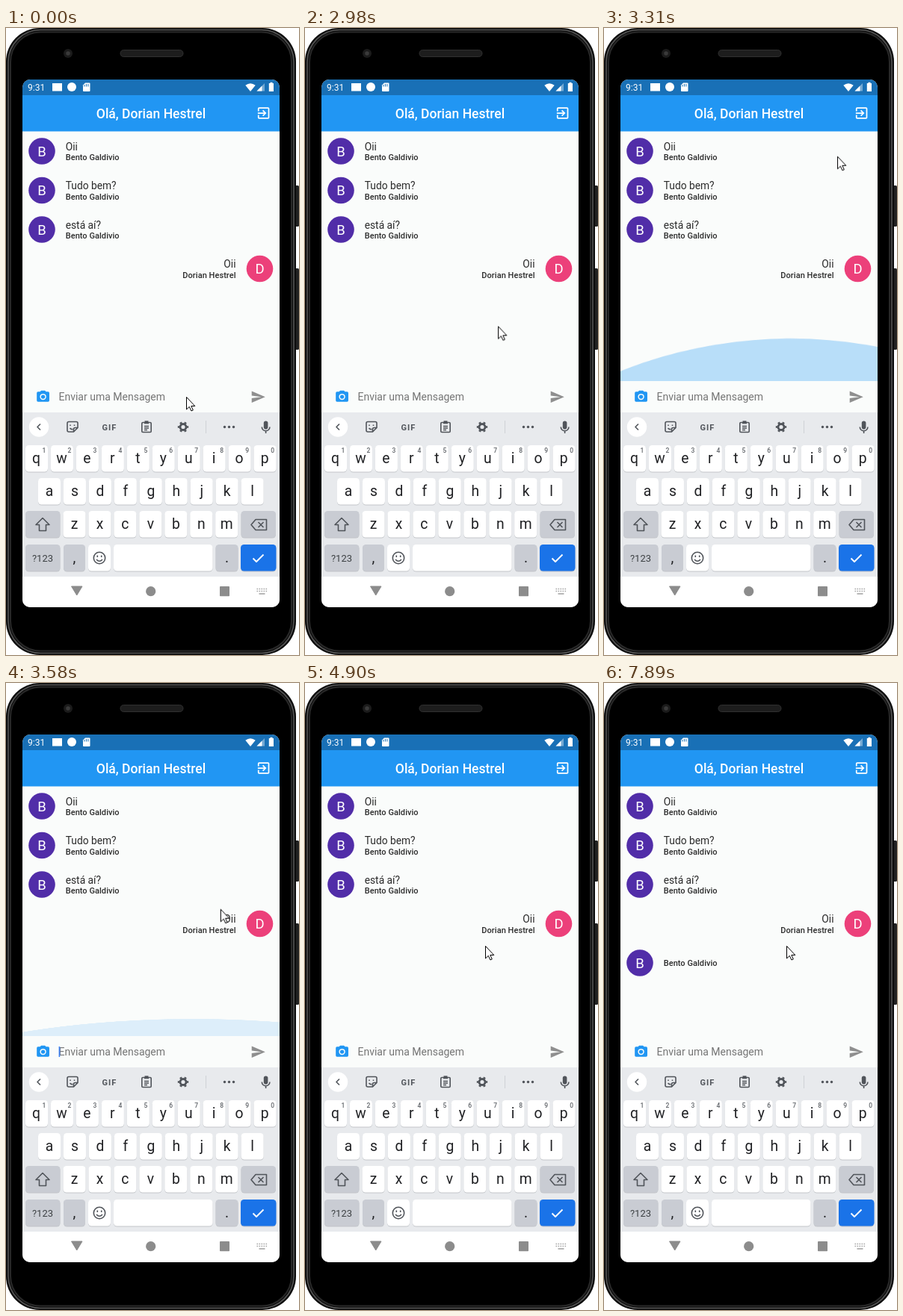
Write an HTML page that moves like this. It is 392 by 840 pixels and loops after 8 s.

```html
<!DOCTYPE html>
<html lang="pt-BR">
<head>
<meta charset="utf-8">
<title>Chat</title>
<style>
  html, body { margin: 0; width: 100%; height: 100%; overflow: hidden; background: #fff; }
  svg { display: block; width: 100%; height: 100%; font-family: Roboto, "Noto Sans", sans-serif; }
  .mid { text-anchor: middle; }
  .end { text-anchor: end; }
  .msg { font-size: 13.8px; fill: #2b2b2b; }
  .name { font-size: 11px; font-weight: 500; letter-spacing: .05px; fill: #2b2b2b; }
  .letter { font-size: 18.5px; fill: #fff; text-anchor: middle; }
  .key { font-size: 19.3px; fill: #202124; text-anchor: middle; }
  .digit { font-size: 8.5px; font-weight: 500; fill: #5f6368; text-anchor: middle; }
  .line { fill: none; stroke: #50545a; stroke-width: 1.6; stroke-linejoin: round; }

  #mouse, #caret, #newRow, .glow { animation: 8s linear infinite; }
  #mouse { animation-name: mouse; }
  #caret { animation-name: blink; animation-timing-function: step-end; }
  #newRow { animation-name: arrive; animation-timing-function: step-end; }
  .glow { fill: #2196f3; }
  #glowEnd { animation-name: pullEnd; transform-origin: 0 473px; }
  #glowStart { animation-name: pullStart; transform-origin: 0 139px; }

  @keyframes mouse {
    0%, 28.6% { transform: translate(241px, 494px); animation-timing-function: cubic-bezier(.5, 0, .8, .6); }
    37.25% { transform: translate(258px, 400px); }
    38.875%, 39.3% { transform: translate(273px, 318px); }
    41.375% { transform: translate(312px, 172px); }
    42% { transform: translate(315px, 158px); animation-timing-function: ease-in-out; }
    44.75% { transform: translate(287px, 302px); animation-timing-function: ease-out; }
    49% { transform: translate(245px, 440px); }
    50.25% { transform: translate(242px, 430px); animation-timing-function: ease-out; }
    55%, 98.62% { transform: translate(241px, 352px); }
    98.625%, 100% { transform: translate(244px, 352px); }
  }
  @keyframes blink {
    0%, 10.875%, 23.625%, 36.125%, 48.625%, 61.25%, 73.625%, 86.375%, 98.625%, 100% { opacity: 0; }
    3.875%, 17.375%, 29.875%, 42.375%, 55%, 67.5%, 80%, 92.375% { opacity: 1; }
  }
  @keyframes arrive {
    0% { opacity: 0; }
    96.875%, 100% { opacity: 1; }
  }
  @keyframes pullEnd {
    0%, 39.125% { transform: scaleY(0); opacity: 0; }
    41.375% { transform: scaleY(.82); opacity: .3; }
    41.825% { transform: scaleY(.9); opacity: .35; animation-timing-function: cubic-bezier(.333, .667, .667, 1); }
    49.325%, 100% { transform: scaleY(0); opacity: 0; }
  }
  @keyframes pullStart {
    0%, 45.5% { transform: scaleY(0); opacity: 0; }
    49.25% { transform: scaleY(.9); opacity: .1; animation-timing-function: cubic-bezier(.333, .667, .667, 1); }
    56.75%, 100% { transform: scaleY(0); opacity: 0; }
  }
</style>
</head>
<body>
<svg viewBox="0 0 392 840">
  <defs>
    <clipPath id="screen"><rect x="22" y="69" width="344" height="707" rx="10.500"/></clipPath>
    <clipPath id="list"><rect x="22" y="139" width="344" height="334"/></clipPath>
  </defs>

  <!-- phone body -->
  <g fill="#222">
    <rect x="386" y="211" width="6" height="55" rx="1.500"/>
    <rect x="386" y="322" width="6" height="109" rx="1.500"/>
  </g>
  <rect width="388" height="840" rx="45" fill="#0c0c0c"/>
  <rect x="3" y="2.500" width="382" height="835" rx="43" fill="none" stroke="#565656" stroke-width="1.600"/>
  <rect x="6" y="5.500" width="376" height="829" rx="40" fill="#000" stroke="#282828" stroke-width="2"/>
  <rect x="153" y="29.500" width="84" height="9" rx="4.500" fill="#1d1d1d" stroke="#303030"/>
  <circle cx="83" cy="34" r="6" fill="#1b1b1b"/>
  <circle cx="83" cy="34" r="2.800" fill="#3a3a3a"/>

  <g clip-path="url(#screen)">
    <rect x="22" y="69" width="344" height="707" fill="#fafcfb"/>

    <!-- status and app bar -->
    <rect x="22" y="69" width="344" height="21" fill="#1970b6"/>
    <rect x="22" y="90" width="344" height="48.500" fill="#2196f3"/>
    <g fill="#fff">
      <text x="29" y="83.500" font-size="12">9:31</text>
      <rect x="62" y="74" width="13" height="10.500"/>
      <circle cx="88" cy="79" r="6"/>
      <path d="M106 73.500h5.500q1 0 1 1v9.500q0 1-1 1h-7.500q-1 0-1-1v-7.500z"/>
      <path d="M104.900 76v2.500M107.400 75v3.500M109.900 75v3.500" stroke="#1970b6"/>
      <path d="M327 85l-6.700-8.300q6.700-5 13.400 0z"/>
      <path d="M335.500 84.500L346 74v10.500z" opacity=".4"/>
      <path d="M335.500 84.500L342.500 77.500v7z"/>
      <path d="M353.500 74v-1.300h3V74h1.500v11h-6.200V74z"/>
      <text class="mid" x="194" y="121" font-size="17.500" font-weight="500">Olá, Dorian Hestrel</text>
      <path transform="translate(334.300 103.700) scale(.86)" d="M10.100 15.600L11.500 17l5-5-5-5-1.400 1.400L12.700 11H3v2h9.700zM19 3H5q-2 0-2 2v4h2V5h14v14H5v-4H3v4q0 2 2 2h14q2 0 2-2V5q0-2-2-2z"/>
    </g>

    <g id="rows"></g>
    <g id="newRow"></g>

    <g clip-path="url(#list)">
      <circle id="glowEnd" class="glow" cx="250" cy="919.800" r="516"/>
      <circle id="glowStart" class="glow" cx="215" cy="-307.800" r="516"/>
    </g>

    <!-- message field -->
    <g transform="translate(39.500 484) scale(.84)" fill="#2196f3">
      <path fill-rule="evenodd" d="M9 2L7.200 4H4Q2 4 2 6v12q0 2 2 2h16q2 0 2-2V6q0-2-2-2h-3.200L15 2zM12 17a5 5 0 1 1 0-10 5 5 0 0 1 0 10z"/>
      <circle cx="12" cy="12" r="3.200"/>
    </g>
    <text x="70.500" y="499" font-size="14" fill="#757575">Enviar uma Mensagem</text>
    <rect id="caret" x="70.600" y="487" width="1.700" height="14" fill="#4285f4"/>
    <path transform="translate(327 484) scale(.86)" d="M2 21L23 12 2 3v7l15 2-15 2z" fill="#8f8f8f"/>

    <!-- keyboard -->
    <rect x="22" y="515" width="344" height="220" fill="#e8eaed"/>
    <circle cx="44" cy="534.500" r="13.200" fill="#fff"/>
    <path class="line" d="M46 530.500l-4 4 4 4"/>
    <g class="line">
      <path d="M84 527.500h10q2 0 2 2v6l-5.500 5.500H84q-2 0-2-2v-9.500q0-2 2-2zM96 535.500h-3.500q-2 0-2 2v3.500"/>
      <path d="M86 531.500v1.500M91.500 531.500v1.500M85.500 536q1.500 2 4 1.500"/>
      <rect x="181.800" y="528.500" width="12.400" height="13" rx="1.300"/>
      <path d="M185 529.500h6M185 533.500h6M185 536h6M185 538.500h4" stroke-width="1.300"/>
      <path d="M185.500 527.800h5" stroke-width="3"/>
      <circle cx="237" cy="534.500" r="4" stroke-width="2.800"/>
      <circle cx="237" cy="534.500" r="6" stroke-width="2.400" pathLength="12" stroke-dasharray=".9 1.100" stroke-dashoffset=".450"/>
      <path d="M342.300 534.500a5.300 5.300 0 0 0 10.600 0M347.600 540v3"/>
    </g>
    <text class="mid" x="138.300" y="538.500" font-size="11" font-weight="700" letter-spacing="1" fill="#50545a">GIF</text>
    <path d="M267.500 526v17" stroke="#cfd2d6"/>
    <g fill="#50545a">
      <circle cx="292.500" cy="534.500" r="1.700"/><circle cx="298.500" cy="534.500" r="1.700"/><circle cx="304.500" cy="534.500" r="1.700"/>
      <rect x="344.800" y="526.500" width="5.600" height="11" rx="2.800"/>
    </g>
    <g id="keys"></g>
    <g class="line">
      <path d="M49 656.500l-9 9h4.500v8h9v-8H58z"/>
      <path d="M334 658.500h14.500v14H334l-6-7zM337.500 662l7 7M344.500 662l-7 7"/>
      <circle cx="125" cy="710" r="7.700"/>
      <path d="M121 712q4 4.500 8 0M122.300 706.500v2.400M127.700 706.500v2.400"/>
      <path d="M330.500 710.500l4.500 4.500 9.500-9.500" stroke="#fff" stroke-width="1.900"/>
    </g>

    <!-- navigation -->
    <rect x="22" y="735" width="344" height="41" fill="#fff"/>
    <g fill="#8c8c8c">
      <path d="M87.500 748h14.500l-7.250 12z" stroke="#8c8c8c" stroke-linejoin="round"/>
      <circle cx="193.700" cy="754.700" r="6.600"/>
      <rect x="286" y="748" width="13" height="13.300" rx=".8"/>
    </g>
    <g fill="none" stroke="#a5a5a5" stroke-width="1.600">
      <path d="M335.500 751.500h14M335.500 754.500h14" stroke-dasharray="1.600 1.400"/>
      <path d="M338.500 758h8"/>
    </g>
  </g>

  <path id="mouse" d="M.5.500V17l3.800-3.600 2.600 5.600 2.400-1-2.500-5.500h5z" fill="#fff" stroke="#000" stroke-linejoin="round"/>
</svg>
<script>
  const BENTO = "Bento Galdivio", DORIAN = "Dorian Hestrel";
  const put = (id, html) => document.getElementById(id).innerHTML = html;
  const text = (cls, x, y, str) => `<text class="${cls}" x="${x}" y="${y}">${str}</text>`;

  function row(cy, name, msg, mine) {
    const x = mine ? 339.5 : 48;
    const tx = mine ? 307.5 : 79.7;
    const side = mine ? " end" : "";
    return `<circle cx="${x}" cy="${cy}" r="17.800" fill="${mine ? "#ec407a" : "#512da8"}"/>` +
      text("letter", x, cy + 6.5, name[0]) +
      (msg ? text("msg" + side, tx, cy - 1.5, msg) : "") +
      text("name" + side, tx, cy + (msg ? 12.3 : 4), name);
  }

  put("rows", row(165, BENTO, "Oii") + row(217.5, BENTO, "Tudo bem?") +
    row(270, BENTO, "está aí?") + row(322.5, DORIAN, "Oii", true));
  put("newRow", row(375, BENTO));

  const GREY = "#c9ccd3";
  const cap = (x, y, w, fill = "#fff") =>
    `<rect x="${x}" y="${y + 1}" width="${w}" height="35.500" rx="4.500" fill="#c3c6ca"/>` +
    `<rect x="${x}" y="${y}" width="${w}" height="35.500" rx="4.500" fill="${fill}"/>`;

  const letters = (str, first, y, numbered) => [...str].map((ch, i) => {
    const x = first + i * 33.95;
    return cap(x - 15, y, 30) + text("key", numbered ? x - .5 : x, y + 24, ch) +
      (numbered ? text("digit", x + 10, y + 10, (i + 1) % 10) : "");
  }).join("");

  put("keys",
    letters("qwertyuiop", 41, 559, true) +
    letters("asdfghjkl", 58, 603) +
    letters("zxcvbnm", 91.5, 647) +
    cap(26, 647, 46.5, GREY) + cap(314.5, 647, 46.5, GREY) +
    cap(26, 692, 46.5, GREY) + cap(77, 692, 29, GREY) + cap(110, 692, 30) +
    cap(144, 692, 132.5) + cap(280.5, 692, 30, GREY) + cap(314, 692, 47.5, "#1a73e8") +
    '<text class="mid" x="49" y="715" font-size="13" fill="#3c4043">?123</text>' +
    text("key", 91.5, 715.5, ",") + text("key", 295.5, 715.5, "."));
</script>
</body>
</html>
```
